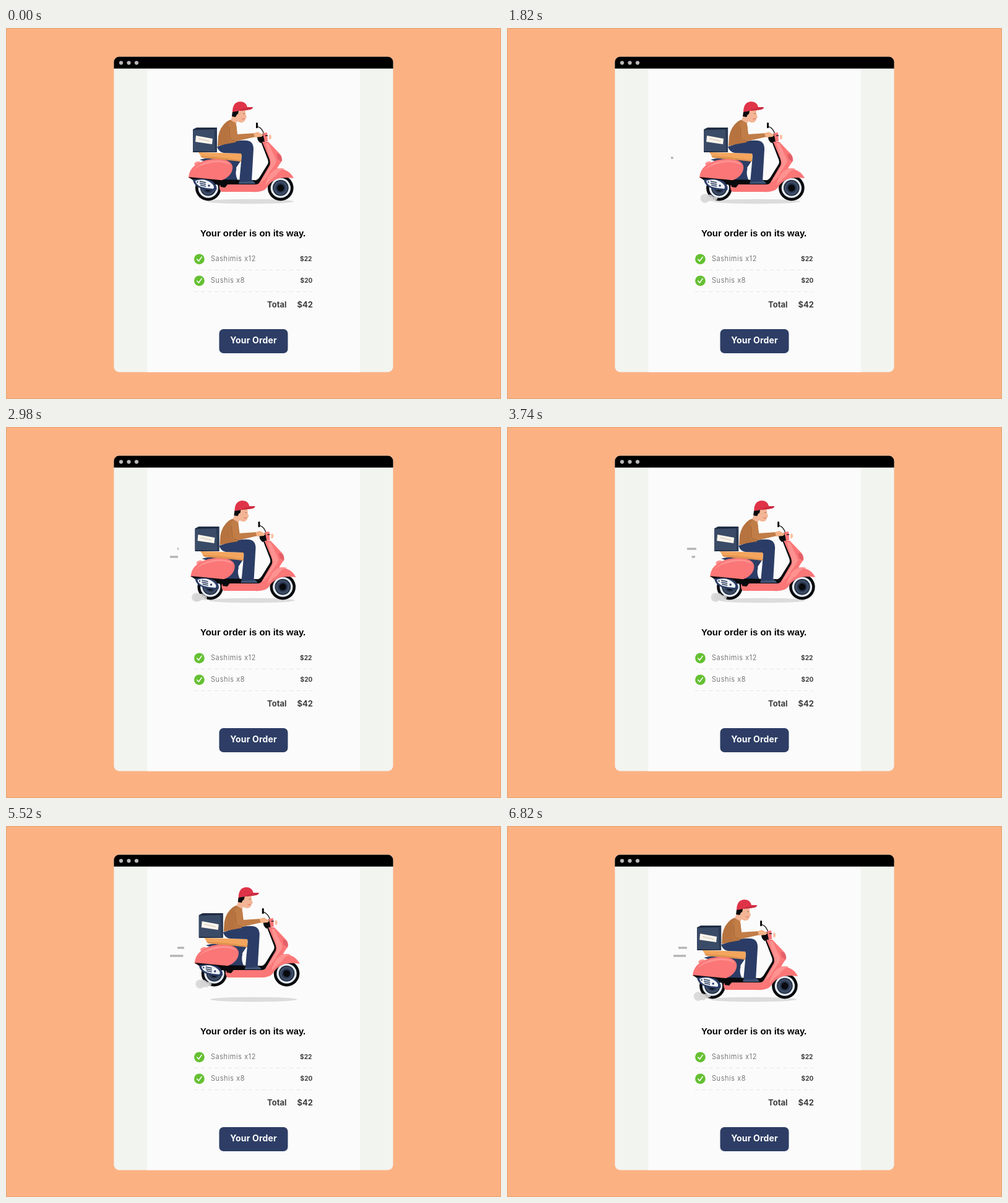
These frames come from a looping animation (800x600 px, 6840 ms). An HTML page:

```html
<!DOCTYPE html>
<html lang="en">
<head>
<meta charset="utf-8">
<title>Order on its way</title>
<style>
html, body { margin: 0; width: 100%; height: 100%; overflow: hidden; background: #fcb183; }
svg { display: block; width: 800px; height: 600px; }
text { font-family: Inter, "Open Sans", sans-serif; fill: #404040; }
.title { font: 700 14.85px "Liberation Sans", Arial, sans-serif; fill: #000; }
.item { font-size: 11px; font-weight: 300; letter-spacing: .62px; fill: #555; }
.price { font-size: 10.2px; font-weight: 700; text-anchor: end; }
.total { font-size: 13px; font-weight: 700; }
.button { font-size: 14px; font-weight: 700; letter-spacing: .15px; fill: #fff; text-anchor: middle; }
.rule { stroke: #e6e6e6; stroke-dasharray: 6 5; }
.coral { fill: #fb7677; }
.light { fill: #fd9290; }
.deep { fill: #e35f68; }
.navy { fill: #2b3d66; }
.ink { fill: #080a0d; }
.paper { fill: #fbfbfb; }
</style>
</head>
<body>
<svg viewBox="0 0 800 600">
  <defs>
    <clipPath id="pane"><rect x="174.4" y="46.4" width="451.2" height="510.2" rx="8.5"/></clipPath>
    <g id="wheel">
      <circle r="20.8" class="ink"/>
      <circle r="16.2" fill="#e3ebf8"/>
      <circle r="12.8" fill="#18212f"/>
      <circle r="11.4" fill="#3d4c66"/>
      <circle r="8" fill="#27344d"/>
      <circle r="5.6" class="ink"/>
    </g>
    <g id="check">
      <circle r="8.4" fill="#65c032"/>
      <path d="M-3.6 .4L-1 3.2L3.8 -3.4" fill="none" stroke="#fff" stroke-width="1.6" stroke-linecap="round"/>
    </g>
  </defs>

  <rect width="800" height="600" fill="#fcb183"/>
  <rect x=".5" y=".5" width="799" height="599" fill="none" stroke="#e3a673"/>
  <g clip-path="url(#pane)">
    <rect x="174" y="46" width="452" height="511" fill="#f2f4ef"/>
    <rect class="paper" x="228.5" y="65" width="343.5" height="492"/>
    <rect x="174" y="46" width="452" height="19.6" fill="#000"/>
  </g>
  <g fill="#b9b9b9">
    <circle cx="186" cy="56.3" r="3.1"/><circle cx="198.5" cy="56.3" r="3.1"/><circle cx="211" cy="56.3" r="3.1"/>
  </g>

  <text class="title" x="314" y="337">Your order is on its way.</text>
  <use href="#check" x="312.4" y="373.8"/>
  <text class="item" x="331" y="377.3">Sashimis x12</text>
  <text class="price" x="494.5" y="377.3">$22</text>
  <path class="rule" d="M304 391.5H495"/>
  <use href="#check" x="312.4" y="408.8"/>
  <text class="item" x="331" y="412">Sushis x8</text>
  <text class="price" x="495.5" y="412">$20</text>
  <path class="rule" d="M304 426.5H495"/>
  <text class="total" x="422" y="452">Total</text>
  <text class="total" x="470.5" y="452">$42</text>
  <rect x="344.5" y="487" width="111" height="39" rx="7" fill="#2d3d65"/>
  <text class="button" x="400" y="510.3">Your Order</text>

  <g stroke="#b5b5b5" stroke-width="3.4">
    <path id="upper"/><path id="lower"/>
  </g>

  <ellipse id="shadow" cx="395" cy="280.5" rx="70" ry="3.8" fill="#dcdcdc"/>
  <g id="ride">
    <!-- wheels and frame -->
    <use href="#wheel" x="326.8" y="258.6"/>
    <use href="#wheel" x="443.8" y="258.6"/>
    <path class="navy" d="M313 213Q342 204 380 214L372 226L379 247L352 250L340 222Z"/>
    <path class="paper" d="M380 216Q366 230 375 247L381 247Z"/>
    <path class="coral" d="M346 252L405 253L421 246L416 261Q408 265 400 265L349 265Q343 262 346 252Z"/>
    <path class="ink" d="M344 245L402 246Q406 247 410 241L423 220Q425 216 422 210L412 184L418 183L432 215L413 247Q409 253 403 253L358 253L354 258L347 257Z"/>
    <path class="coral" d="M414 184L424 184L443 204Q447 209 446 215Q442 220 438 227Q458 228 465 243Q446 240 436 245Q426 250 421 259Q415 266 398 265Q398 260 409 251L426 222Q428 217 425 210Z"/>
    <path class="light" d="M419 187L424 186L436 212Q438 217 433 223L418 245Q429 232 438 227Q425 238 410 252L427 223Q429 218 426 210Z"/>
    <path class="deep" d="M437 203L443 205Q447 211 445 216L439 212Z"/>
    <path class="light" d="M431 232Q440 224 451 228Q443 228 435 240Q426 246 419 255Q422 240 431 232Z"/>

    <!-- rear fairing and exhaust -->
    <path class="light" d="M304 220Q306 215 314 216L308 225Z"/>
    <path class="coral" d="M295 242Q296 227 310 219Q326 210 350 212Q368 216 366 228Q364 240 349 246L331 247Q312 244 296 243Z"/>
    <path class="light" d="M302 230Q317 213 345 214Q360 215 363 222Q350 215 332 218Q314 221 302 230Z"/>
    <path class="ink" d="M295 241L347 246L353 250L346 254L338 253L302 246Z"/>
    <path class="navy" d="M302 245Q321 242 334 248Q342 255 340 262Q329 264 316 260Q303 255 302 245Z"/>
    <path d="M306 247Q321 242 332 251Q338 256 335 260Q326 260 316 257Q307 254 306 247Z" fill="#f0f3fa"/>
    <path d="M313 248L323 250M313 251L323 253M314 254L323 256" stroke="#2b3b59" stroke-width="1.5"/>
    <g class="navy"><circle cx="309.5" cy="249" r="1.2"/><circle cx="328" cy="255" r="1.7"/></g>

    <!-- seat and box -->
    <path d="M311 201L381 203L380 216Q365 213 350 212Q329 212 316 209Z" fill="#f3a55d"/>
    <path d="M314 207Q345 208 380 214L380 216Q345 212 317 210Z" fill="#e0934f"/>
    <path d="M302 164L308 161L341 161L341 201L302 201Z" fill="#202d43"/>
    <path d="M302 165L337 164L338 200L302 199Z" fill="#3a4b67"/>
    <path d="M337 164L341 161L341 201L338 200Z" fill="#2b3a54"/>
    <path d="M307 174L334 179L333 188L306 184Z" fill="#faf4eb"/>
    <path d="M311 179L329 183" stroke="#d8d3ca" stroke-width="1.4"/>

    <!-- handlebar -->
    <path d="M417 173Q415 162 406 159" fill="none" stroke="#111" stroke-width="1.3"/>
    <rect x="404" y="153" width="3" height="9" rx="1" class="ink"/>
    <path class="ink" d="M406 174L416 171L419 182L411 186Q405 181 406 174Z"/>
    <path class="coral" d="M415 170L422 169L423 183L418 184Z"/>
    <path d="M419 174H423" stroke="#222" stroke-width="1.5"/>
    <path d="M425 173Q429 171 429 177Q428 181 425 180Z" fill="#fbc0a0"/>

    <!-- rider -->
    <path d="M376 252L377 248L396 246Q402 248 403 252Z" fill="#405475"/>
    <path class="navy" d="M341 192L358 186Q376 181 389 182Q400 183 400 196L397 248L377 249L381 206L380 203L352 202Q344 201 341 192Z"/>
    <path d="M342 191L343 175Q346 160 356 152Q364 146 371 149L374 172L371 185L354 188Z" fill="#b6733f"/>
    <path d="M360 156Q363 148 370 152Q374 157 372 172L402 170L403 176L368 184Q360 185 360 178Z" fill="#c17d47"/>
    <path d="M361 160L362 177Q362 183 370 182" fill="none" stroke="#97592d" stroke-width=".8"/>
    <path d="M400 170L407 168L416 173L413 176L402 177Z" fill="#f4b388"/>
    <path d="M367 139L372 133L387 132L387 139L389 144L387 147Q386 153 379 153L374 151L372 154L363 149Z" fill="#f3b595"/>
    <path d="M381 147H386" stroke="#d96557" stroke-width=".9"/>
    <path d="M383 138.5H386" stroke="#8a5f4c" stroke-width=".8"/>
    <path class="ink" d="M366 135L376 134L375 139L373 140L371 144L365 143Z"/>
    <path d="M366 136Q366 120 378 119Q388 119 390 128L399 128Q399 131 394 132L387 133L376 134Z" fill="#df3348"/>
    <path d="M376 134Q383 129 399 128Q398 132 387 133Z" fill="#c92a40"/>

    <g id="smoke" fill="#d5d5d5" fill-opacity=".85">
      <circle/><circle/><circle/><circle/>
    </g>
  </g>
</svg>
<script>
const LOOP = 6840, CYCLE = 2370, PEAK = 1220, REACH = 34.6;
const $ = id => document.getElementById(id);
const clamp = v => Math.max(0, Math.min(1, v));
const smooth = p => p * p * (3 - 2 * p);
const mod = (a, b) => ((a % b) + b) % b;
const puffs = [...$('smoke').children];

// Quick surge forward, then a gentle drift back
function drift(t) {
  const u = t % CYCLE;
  if (u < PEAK) return REACH * smooth((u / PEAK) ** 2.35);
  return REACH / 2 * (1 + Math.cos(Math.PI * (u - PEAK) / (CYCLE - PEAK)));
}

function hop(t) {
  const u = (t % 2800 - 2643) / 260;
  return 22 * Math.max(0, 1 - u * u);
}

// The head runs ahead of the tail, both towards the left end
function streak(id, y, right, left, u, head, tail) {
  const at = ([from, to]) => right - (right - left) * clamp((u - from) / (to - from));
  const a = at(head), b = at(tail);
  $(id).setAttribute('d', b - a > .2 ? `M${a} ${y}H${b}` : '');
}

function puff(el, x, y, r) {
  el.setAttribute('cx', x);
  el.setAttribute('cy', y);
  el.setAttribute('r', r);
}

function draw(now) {
  const t = now % LOOP, x = drift(t);
  $('ride').setAttribute('transform', `translate(${x} ${-hop(t)})`);
  $('shadow').setAttribute('transform', `translate(${x * .55} 0)`);

  const u = t < 800 ? -200 : mod(t - 850, 1360) - 150;
  streak('upper', 197, 306, 277, u, [-150, 180], [76, 660]);
  streak('lower', 210, 304, 265, u, [-45, 430], [63, 900]);

  const grow = clamp(t / 450);
  puff(puffs[0], 304, 275.6, 7.4 * grow);
  puffs.slice(1).forEach((el, i) => {
    const p = (t / 600 + i / 3) % 1;
    puff(el, 322 - 15 * p, 275.5 + Math.sin(i * 2.1), (2.6 + 4 * p) * grow);
  });
}

function tick() {
  draw(performance.now());
  requestAnimationFrame(tick);
}
draw(0);
requestAnimationFrame(tick);
</script>
</body>
</html>
```
